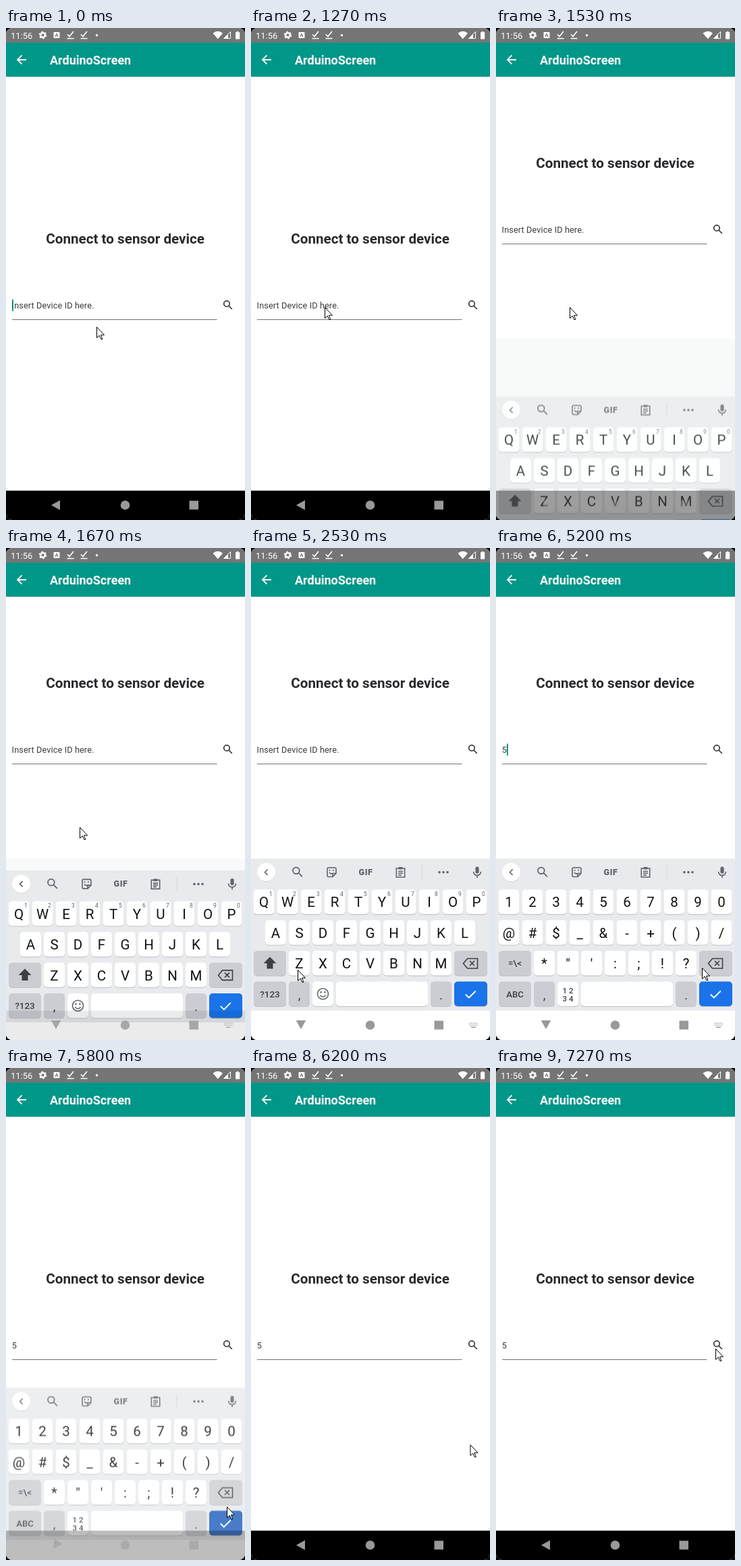
Recreate the animation shown at these times as an HTML page. Size 354 by 728 pixels, loop 8000 ms.

```html
<!DOCTYPE html>
<html lang="en">
<head>
<meta charset="utf-8">
<title>Connect to sensor device</title>
<style>
  html, body { margin: 0; width: 100%; height: 100%; overflow: hidden; background: #000; }
  svg { display: block; width: 354px; height: 728px; clip-path: inset(0 round 9px); }
  text { font-family: Roboto, sans-serif; }
  .mid { text-anchor: middle; }
  .dark { fill: #3c4043; }
  .line { fill: none; stroke: #5f6368; stroke-width: 1.6; }
  #back { transform-origin: 73.5px 705.5px; }
</style>
</head>
<body>
<svg id="stage" viewBox="0 0 354 728"></svg>
<script>
const LOOP = 8000, TICK = 1000 / 15;
const LIFT = 112, BOARD = 226;

const rect = (x, y, w, h, fill, more = '') =>
  `<rect x="${x}" y="${y}" width="${w}" height="${h}" fill="${fill}" ${more}/>`;
const path = (d, more = '') => `<path d="${d}" ${more}/>`;
const circle = (x, y, r, more = '') => `<circle cx="${x}" cy="${y}" r="${r}" ${more}/>`;
const group = (id, body, more = '') => `<g id="${id}" ${more}>${body}</g>`;
const label = (x, y, size, str, more = '') =>
  `<text x="${x}" y="${y}" font-size="${size}" ${more}>${str.replace(/&/g, '&amp;').replace(/</g, '&lt;')}</text>`;
const repeat = (n, draw) => Array.from({ length: n }, (_, i) => draw(i)).join('');

const search = (x, y, scale, color) =>
  `<g transform="translate(${x} ${y}) scale(${scale})" fill="none" stroke="${color}" stroke-width="2">` +
  circle(9.5, 9.5, 5.5) + path('M13.6 13.6l6.2 6.2') + '</g>';

// Keyboard grid
const GREY = '#cbcdd2';
const rowY = row => 505.3 + 45.4 * row;
const key = (x, row, w, fill = '#fff', more = '') =>
  rect(x, rowY(row) + 1.1, w, 36.5, '#000', 'rx="5" opacity=".17"') +
  rect(x, rowY(row), w, 36.5, fill, `rx="5" ${more}`);
const keyRow = (chars, cx, row) => repeat(chars.length, i =>
  key(cx + 35 * i - 15.5, row, 31, '#fff', chars[i] === '5' ? 'id="five"' : '') +
  label(cx + 35 * i, rowY(row) + 26, 20.5, chars[i], 'class="mid" fill="#111"'));

function statusBar() {
  const tick = x => path(`M${x} 9.5l3 3 6-7.5M${x - .5} 15.5h10`, 'fill="none" stroke="#fff" stroke-width="1.6"');
  return rect(0, 0, 354, 21.7, '#757575') +
    label(7, 15.5, 13, '11:56', 'fill="#fff"') +
    circle(54.5, 10.5, 3.3, 'fill="none" stroke="#fff" stroke-width="2.4"') +
    circle(54.5, 10.5, 5, 'fill="none" stroke="#fff" stroke-width="1.6" stroke-dasharray="2.6 2.636"') +
    rect(70.5, 6, 9, 9, '#fff', 'rx="1"') +
    label(75, 13.3, 8, 'A', 'class="mid" font-weight="700" fill="#757575"') +
    tick(91) + tick(111) + circle(134.5, 10.7, 1.7, 'fill="#fff"') +
    path('M306.5 7.8Q314 1.8 321 7.8L313.8 16.2Z', 'fill="#fff"') +
    path('M332.5 5.5V15.5H322.5Z', 'fill="none" stroke="#fff"') +
    path('M329 8.5V15.5H322.5Z', 'fill="#fff"') +
    path('M340 6.2h1.8V5h2.6v1.2h1.8V16.5H340Z', 'fill="#fff"');
}

function appBar() {
  return rect(0, 72, 354, 1, '#000', 'opacity=".1"') + rect(0, 21, 354, 51, '#009688') +
    path('M30 47H17.5M23.4 40.4L17 46.9l6.4 6.4', 'fill="none" stroke="#fff" stroke-width="1.8"') +
    label(65, 54, 18, 'ArduinoScreen', 'font-weight="700" fill="#fff"');
}

function form() {
  const field = 'fill="#3c3c3c" letter-spacing=".12"';
  return group('form',
    label(176.6, 319.3, 20.65, 'Connect to sensor device', 'class="mid" font-weight="700" fill="#2b292d"') +
    label(8.6, 415, 12.7, 'Insert Device ID here.', `id="hint" ${field}`) +
    label(8.8, 415, 12.7, '5', `id="value" ${field}`) +
    rect(9, 431, 303.5, 1, '#737373') +
    circle(328.5, 410, 17, 'id="ripple" fill="#e6e6e6"') +
    search(319.6, 400.7, .77, '#262626') +
    rect(9, 401.5, 1.8, 17.5, '#00897b', 'id="caret"'));
}

function toolbar() {
  return circle(22.5, 480.4, 13.5, 'fill="#cfd2d6"') + circle(22.5, 479.6, 13.5, 'fill="#fff"') +
    path('M24.7 475.5l-4.2 4.2 4.2 4.2', 'class="line"') +
    search(58.5, 469, .88, '#5f6368') +
    path('M115 473h9q2 0 2 2v6.5l-5 5h-6q-2 0-2-2v-9.500q0-2 2-2M126 481.500h-5v5M116 480q2 3 4.500 1.500', 'class="line"') +
    rect(115.7, 476, 1.8, 1.8, '#5f6368') + rect(121, 476, 1.8, 1.8, '#5f6368') +
    label(170, 483.6, 12.5, 'GIF', 'class="mid" font-weight="900" letter-spacing=".6" fill="#5f6368"') +
    path('M215.3 474h12.4v13h-12.4zM218 478.5h7M218 481.2h7M218 484h5', 'class="line"') +
    rect(218.5, 472, 6, 3.6, '#5f6368', 'rx="1"') +
    rect(252.5, 470, 1, 19, '#d2d4d8') +
    repeat(3, i => circle(279 + 6 * i, 479.8, 1.8, 'fill="#5f6368"')) +
    rect(332.4, 471.5, 5.2, 10, '#5f6368', 'rx="2.6"') +
    path('M329.5 479a5.5 5.5 0 0 0 11 0M335 484.5v3.5', 'class="line"');
}

function keyboard() {
  const small = (x, y, size, str) => label(x, y, size, str, 'class="mid dark" font-weight="500"');
  const letters = keyRow('QWERTYUIOP', 19, 0) + keyRow('ASDFGHJKL', 36.5, 1) + keyRow('ZXCVBNM', 71.5, 2) +
    repeat(10, i => label(29.5 + 35 * i, 515, 8.5, String((i + 1) % 10), 'class="mid" fill="#5f6368"')) +
    path('M28 605l-9.5 9.5h5v8h9v-8h5z', 'class="dark"') +
    small(28, 664.8, 13.5, '?123') +
    circle(106.5, 659.8, 8, 'class="line"') + path('M102.4 661.8q4.1 5 8.2 0', 'class="line"') +
    circle(103.6, 657.3, 1.3, 'fill="#5f6368"') + circle(109.4, 657.3, 1.3, 'fill="#5f6368"');
  const symbols = rect(0, 503, 354, 91, '#e8eaed') +
    keyRow('1234567890', 19, 0) + keyRow('@#$_&-+()/', 19, 1) + keyRow('*"\':;!?', 71.5, 2) +
    small(28, 619, 13.5, '=\\<') + small(28, 664.8, 13.2, 'ABC') +
    small(106.5, 659, 11.5, '1 2') + small(106.5, 670.5, 11.5, '3 4');
  return group('board',
    rect(0, 459.5, 354, BOARD, '#e8eaed') + rect(0, 684.6, 354, 270, '#fff') + toolbar() +
    key(4, 2, 48, GREY) + key(301, 2, 49, GREY) +
    path('M320.5 607.5h15v14.500h-15l-6-7.250zM324 611l7 7M331 611l-7 7', 'class="line" style="stroke:#3c4043"') +
    key(4, 3, 48, GREY) + key(56, 3, 31, GREY) + key(91, 3, 31) + key(126, 3, 136) + key(266, 3, 31, GREY) +
    key(301, 3, 49, '#1a73e8', 'id="enter"') +
    label(71.5, 668, 19, ',', 'class="mid dark"') + label(281.5, 668, 19, '.', 'class="mid dark"') +
    path('M317.8 660.5l5 5 10-10', 'fill="none" stroke="#fff" stroke-width="1.9"') +
    group('letters', letters) + group('symbols', symbols));
}

function navBar() {
  const dots = repeat(10, i => rect(323.5 + 2.6 * (i % 5), 702.5 + 2.8 * (i >= 5), 1.4, 1.4, '#999'));
  return rect(0, 684.6, 354, 44, '#000', 'id="shade"') +
    group('nav',
      path('M67 706L80 698.7V713.3Z', 'id="back"') + circle(176.5, 706, 6.8) + rect(271.5, 699.5, 13.5, 13, '#999') +
      group('switcher', dots + rect(326, 708.4, 7, 1.4, '#999')),
      'fill="#999"');
}

const pointer = path('M.5.5V16.5L4.2 13 6.8 18.500H8.800L6.500 12.200H11.500Z',
  'id="pointer" fill="#fff" stroke="#000" stroke-linejoin="round"');

document.getElementById('stage').innerHTML =
  rect(0, 0, 354, 728, '#fff') + rect(0, 460, 354, 268, '#f8faf9', 'id="under"') +
  form() + appBar() + statusBar() + keyboard() + navBar() + pointer;

// Motion
const style = id => document.getElementById(id).style;
const ramp = (t, from, to) => Math.min(1, Math.max(0, (t - from) / (to - from)));
const move = (id, x, y) => { style(id).transform = `translate(${x}px,${y}px)`; };
const show = (id, on) => { style(id).opacity = Number(on); };

// Pointer moves: from ms, to ms, x, y
const HOME = [134, 442];
const MOVES = [
  [130, 470, 109, 413], [2060, 2530, 69, 624], [2530, 2930, 35, 667],
  [3460, 3730, 57, 635], [3800, 4130, 139, 545], [4130, 4400, 158, 526],
  [4800, 5200, 305, 621], [5200, 5470, 327, 649], [6000, 6470, 321, 433], [6470, 6870, 325, 415]
];

function pointerAt(t) {
  return MOVES.reduce(([x, y], [from, to, nx, ny]) => {
    const p = ramp(t, from, to);
    return [x + (nx - x) * p, y + (ny - y) * p];
  }, HOME);
}

function pose(t) {
  const typed = t >= 4730, symbols = t >= 3270, raised = t >= 1470 && t < 5730;
  move('form', 0, raised ? -LIFT : 0);
  show('under', raised);
  show('hint', !typed);
  show('value', typed);
  show('ripple', t >= 7200 && t < 7270);
  show('letters', !symbols);
  show('symbols', symbols);
  show('switcher', t >= 1330 && t < 5730);
  show('caret', t < 5270 && Math.floor((t - 200) / 503) & 1);
  move('caret', typed ? 7 : 0, 0);

  // The keyboard eases out on entry and accelerates on exit.
  const enter = ramp(t, 1400, 1870), leave = ramp(t, 5670, 6070);
  const rest = (1 - enter) ** 3, fade = leave ** 1.2;
  const shade = Math.max(rest, fade);
  move('board', 0, BOARD * Math.max(rest, leave ** 2.5));
  style('board').opacity = Math.min(1, enter * 2.7) * (1 - .8 * fade);
  style('shade').opacity = shade;
  style('nav').opacity = 1 - 2.4 * shade * (1 - shade);
  style('back').transform = `rotate(${-90 * (ramp(t, 1270, 1600) - ramp(t, 5670, 6000))}deg)`;

  style('five').fill = t >= 4730 && t < 4870 ? '#d5d7db' : '#fff';
  style('enter').fill = t >= 5670 ? '#185abc' : '#1a73e8';
  move('pointer', ...pointerAt(t));
}

const start = performance.now();
function draw() {
  const now = (performance.now() - start) % LOOP;
  pose(Math.round(Math.floor((now + 5) / TICK) * TICK / 10) * 10);
  requestAnimationFrame(draw);
}
draw();
</script>
</body>
</html>
```
